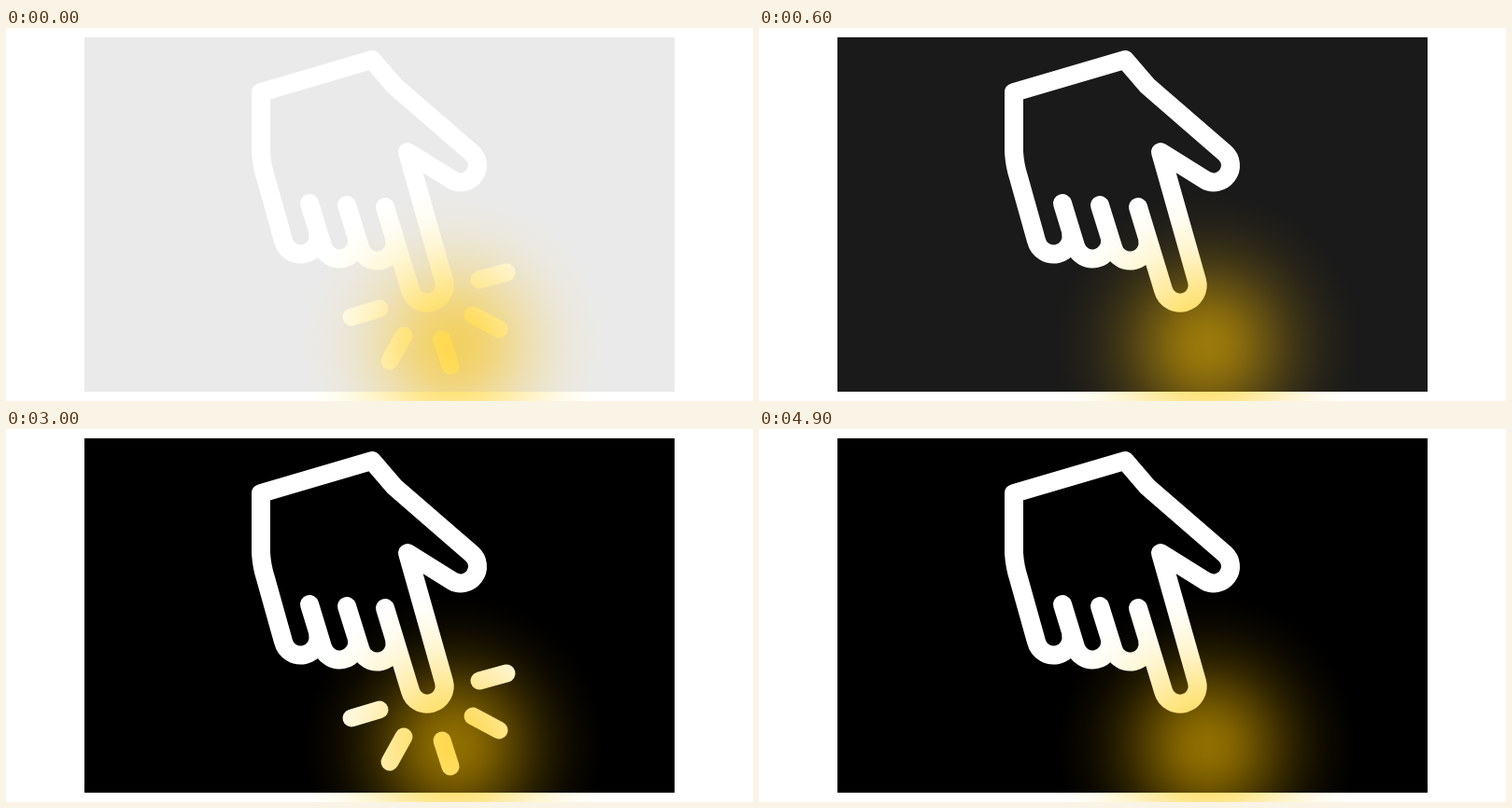
These frames come from a looping animation (800x400 px, 5 s). An HTML page with a canvas:

```html
<!DOCTYPE html>
<html lang="en">
<head>
<meta charset="utf-8">
<title>Tap</title>
<style>
html, body { margin: 0; width: 100%; height: 100%; overflow: hidden; background: #fff; }
canvas { display: block; width: 800px; height: 400px; }
</style>
</head>
<body>
<canvas id="stage" width="800" height="400"></canvas>
<script>
const ctx = document.getElementById('stage').getContext('2d');
const LOOP = 5000, STEP = 100;
const FADE = 1185, FADE_LEAD = 33;
const BLINK = 783, BLINK_START = 184, HIDDEN = 456;
const GLOW = { x: 480, y: 340, r: 165 };

const hand = new Path2D(
  'M406 192 L433 281 A18.5 18.5 0 0 0 469 271 L430 133 L478 163 ' +
  'A18 18 0 0 0 499 134 L416 62 L392 34 L273 69 V133 Q274 148 278 160 ' +
  'L297 228 A19 19 0 0 0 334 219 ' +
  'M325 188 L339 234 A19 19 0 0 0 376 226 ' +
  'M365 190 L379 235 A19 19 0 0 0 416 226');
const rays = new Path2D(
  'M507 270 L536 262 M500 308 L528 323 M467 334 L476 362 ' +
  'M426 330 L411 357 M370 310 L400 301');

function radial(colorAt) {
  const g = ctx.createRadialGradient(GLOW.x, GLOW.y, 0, GLOW.x, GLOW.y, GLOW.r);
  for (let i = 0; i <= 16; i++) g.addColorStop(i / 16, colorAt(i / 16 * GLOW.r));
  return g;
}

// Bell-shaped falloff that reaches zero at the rim
function bell(d, spread) {
  const f = v => Math.exp(-v * v / (2 * spread * spread));
  return (f(d) - f(GLOW.r)) / (1 - f(GLOW.r));
}

const glow = radial(d => `rgba(248,190,0,${0.58 * bell(d, 62)})`);
const tint = radial(d => {
  const k = bell(d, 70);
  return `rgb(255,${255 - 38 * k},${255 - 175 * k})`;
});

function raysVisible(t) {
  if (t < BLINK_START) return true;
  return (t - BLINK_START) % BLINK >= HIDDEN;
}

function draw(t) {
  ctx.fillStyle = '#fff';
  ctx.fillRect(0, 0, 800, 400);
  ctx.fillStyle = tint;
  ctx.fillRect(0, 390, 800, 10);

  const left = Math.max(0, 1 - (t + FADE_LEAD) / FADE);
  const v = Math.round(255 * left ** 3);
  ctx.fillStyle = `rgb(${v},${v},${v})`;
  ctx.fillRect(84, 10, 632, 380);
  ctx.fillStyle = glow;
  ctx.fillRect(84, 10, 632, 380);

  ctx.strokeStyle = tint;
  ctx.lineCap = ctx.lineJoin = 'round';
  ctx.lineWidth = 20;
  ctx.stroke(hand);
  if (raysVisible(t)) {
    ctx.lineWidth = 19;
    ctx.stroke(rays);
  }
}

const start = performance.now();
function tick() {
  const t = (performance.now() - start) % LOOP;
  draw(Math.floor(t / STEP) * STEP);
  requestAnimationFrame(tick);
}
tick();
</script>
</body>
</html>
```
